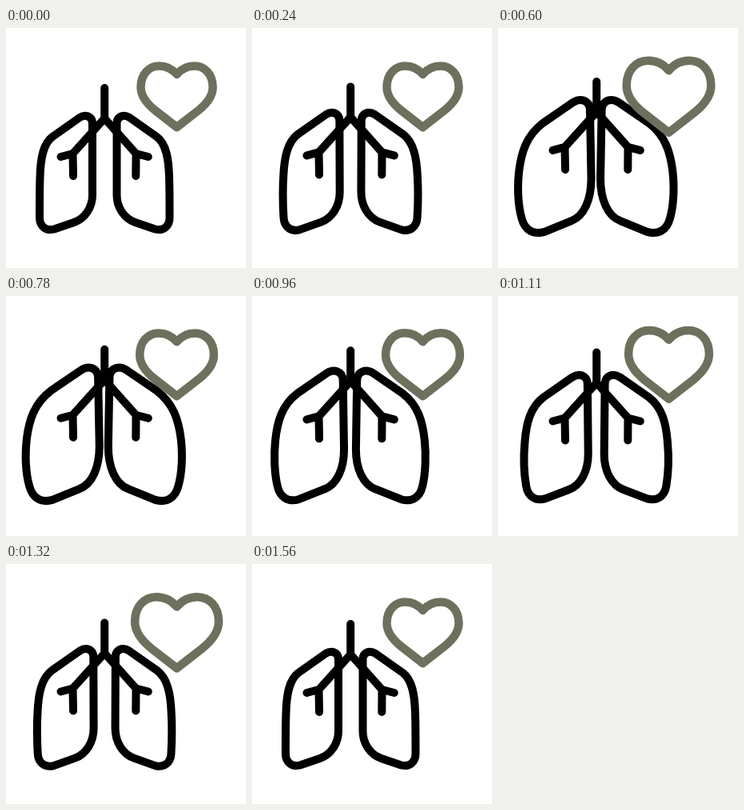
Recreate the animation shown at these times as an HTML page. Size 300 by 300 pixels, loop 1650 ms.

```html
<!DOCTYPE html>
<html lang="en">
<head>
<meta charset="utf-8">
<title>Breathing lungs and heart</title>
<style>
  html, body { margin: 0; width: 100%; height: 100%; overflow: hidden; background: #fff; }
  svg { display: block; width: 100%; height: 100%; }
</style>
</head>
<body>
<svg viewBox="0 0 300 300" fill="none" stroke="#000" stroke-width="10" stroke-linecap="round" stroke-linejoin="round">
  <path id="lung"/>
  <use id="mirrored" href="#lung"/>
  <path id="airway" d="M123.2 75V113L83.5 157M68.5 161L83.5 157L84 185M123.2 113L162.5 157M177.8 161L162.5 157L162.3 185"/>
  <path id="heart" stroke="#6d705c"
    d="M0 38L-27 17C-37 9 -45 0 -45 -12C-45 -28 -35 -38.5 -22 -38.5C-13 -38.5 -5 -34 0 -28C5 -34 13 -38.5 22 -38.5C35 -38.5 45 -28 45 -12C45 0 37 9 27 17Z"/>
</svg>
<script>
const LOOP = 1650, STEP = 30, REST = 2, LAST = 50;
const exhaled = 'M92 112C100 107 108 111 108 119L108 209C108 224 99 238 85 243L60 251.5C50 254 42 248 42 237C42 222 42 200 42.5 187C43 164 46 145 58 136Z';
const inhaled = 'M94 92C103 86 114.5 89 115.3 101L117 187C117 214 108 235 92 241L58 255C44 259 33 253 29 238C24 222 23 198 25.5 178C28.5 155 35 134 56 118Z';
const inhaledValues = inhaled.match(/[\d.]+/g);

// [step, value] keys
const breathKeys = [[0, 0], [21, 1], [50, 0]];
const beatKeys = [[0, 0], [10, 0], [18.5, 1], [26, 0], [40.5, 1], [50, 0]];

const [lung, mirrored, airway, heart] =
  ['lung', 'mirrored', 'airway', 'heart'].map(id => document.getElementById(id));

const mix = (a, b, k) => a + (b - a) * k;
const ease = k => (1 - Math.cos(Math.PI * k)) / 2;

function sample(keys, step) {
  const n = Math.max(1, keys.findIndex(([at]) => at >= step));
  const [[t0, a], [t1, b]] = [keys[n - 1], keys[n]];
  return mix(a, b, ease((step - t0) / (t1 - t0)));
}

function morph(k) {
  let n = 0;
  return exhaled.replace(/[\d.]+/g, v => mix(+v, +inhaledValues[n++], k).toFixed(2));
}

function draw(now) {
  const tick = Math.floor((now % LOOP) / STEP) - REST;
  const step = Math.min(LAST, Math.max(0, tick));
  const breath = sample(breathKeys, step);
  const scale = 1 + 0.175 * sample(beatKeys, step);
  lung.setAttribute('d', morph(breath));
  mirrored.setAttribute('transform', `translate(${mix(246.5, 244.5, breath)} 0) scale(-1 1)`);
  airway.setAttribute('transform', `translate(0 ${-8.5 * breath})`);
  heart.setAttribute('transform', `translate(213.5 86) scale(${scale})`);
  heart.setAttribute('stroke-width', 10.5 / scale);
}

const start = performance.now();
function loop() {
  draw(performance.now() - start);
  requestAnimationFrame(loop);
}
loop();
</script>
</body>
</html>
```
